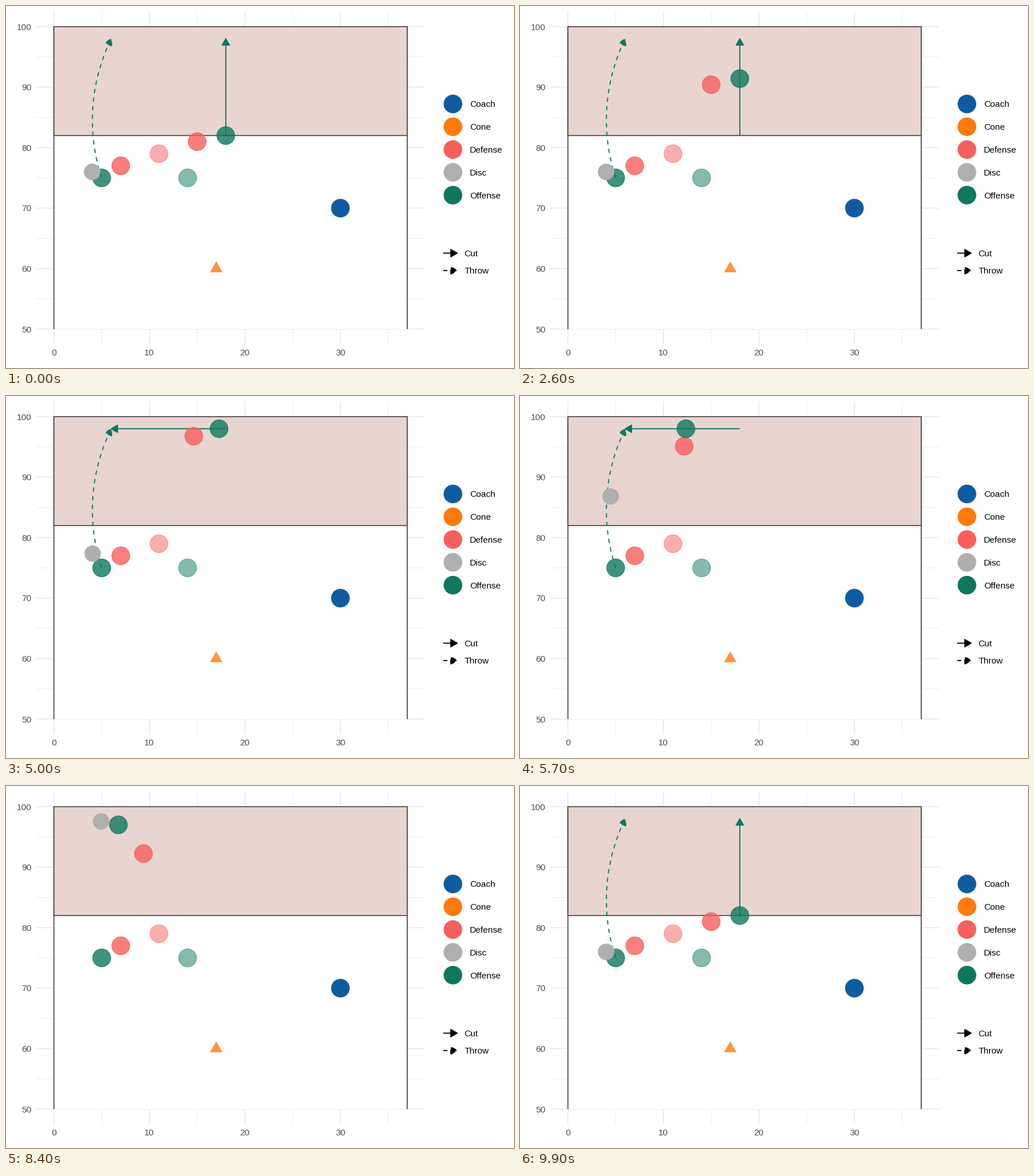
Animation of 885 by 632 pixels, one loop 10000 ms. Source, as a matplotlib script:

```python
import numpy as np
import matplotlib.pyplot as plt
from matplotlib.animation import FuncAnimation
from matplotlib.lines import Line2D
from matplotlib.patches import Circle, Polygon, Rectangle

W, H, DPI = 885, 632, 100
PT = 72 / DPI            # pixels to points
LINE = 1.87              # standard line width in pixels
RING = 1.24              # outline of the markers

BLUE, ORANGE, RED = "#0E5C9F", "#FF7A0A", "#F75F5B"
GRAY, GREEN = "#AFAFAF", "#0F775F"
GRID, BORDER, ZONE = "#EBEBEB", "#575053", "#E8D5D0"

plt.rcParams["font.family"] = "Liberation Sans"
plt.rcParams["path.snap"] = False

fig = plt.figure(figsize=(W / DPI, H / DPI), dpi=DPI, facecolor="white")
ax = fig.add_axes([0, 0, 1, 1])
ax.set_xlim(0, W)
ax.set_ylim(H, 0)
ax.axis("off")


def px(x, y):
    """Field coordinates to stage pixels."""
    return np.array([83.5 + 16.635 * x, 564.1 - 10.56 * (y - 50)])


def line(points, color, width=LINE, style="-", z=1):
    xs, ys = np.transpose(points)
    return ax.add_line(Line2D(xs, ys, color=color, lw=width * PT, ls=style, zorder=z,
                              solid_capstyle="butt", dash_capstyle="butt"))


def label(x, y, text, color="black", ha="left"):
    ax.text(x, y + 5.5, text, color=color, ha=ha, va="baseline", fontsize=15.45 * PT)


def dot(center, color, radius=15.6, alpha=1.0, z=6):
    return ax.add_patch(Circle(center, radius, facecolor=color, edgecolor=color,
                               lw=RING * PT, alpha=alpha, zorder=z))


def arrow(points, color, style="-"):
    """Line with a filled head whose outline shares the line style."""
    points = np.asarray(points, float)
    tip = points[-1]
    dx, dy = points[-2] - tip
    back = np.arctan2(dy, dx)
    wings = [tip + 12.64 * np.array([np.cos(a), np.sin(a)])
             for a in (back - np.pi / 6, back + np.pi / 6)]
    head = Polygon([wings[0], tip, wings[1]], closed=True, facecolor=color,
                   edgecolor=color, lw=LINE * PT, ls=style, joinstyle="round",
                   capstyle="butt", zorder=4)
    return [line(points, color, style=style, z=4), ax.add_patch(head)]


def arc(p, q, sag):
    """Circular arc from p to q that bulges left by sag."""
    half = np.hypot(*(q - p)) / 2
    u = (q - p) / (2 * half)
    n = np.array([u[1], -u[0]])
    r = (half ** 2 + sag ** 2) / (2 * sag)
    center = (p + q) / 2 - n * (r - sag)
    phi = np.arcsin(half / r)
    return [center + r * (n * np.cos(a) + u * np.sin(a))
            for a in np.linspace(-phi, phi, 81)]


DASH = (0, (4, 4))

# Grid and axis labels
LEFT, RIGHT, TOP, BOTTOM = 52.8, 729.8, 9.7, 590.5
for v in range(0, 40, 5):
    x = px(v, 50)[0]
    line([(x, TOP), (x, BOTTOM)], GRID, LINE if v % 10 == 0 else LINE / 2)
    if v % 10 == 0:
        label(x, 605, str(v), "#4D4D4D", "center")
for v in range(50, 101, 5):
    y = px(0, v)[1]
    line([(LEFT, y), (RIGHT, y)], GRID, LINE if v % 10 == 0 else LINE / 2)
    if v % 10 == 0:
        label(44.2, y, str(v), "#4D4D4D", "right")


def box(low, high, **kw):
    (x0, y0), (x1, y1) = px(*low), px(*high)
    ax.add_patch(Rectangle((x0, y1), x1 - x0, y0 - y1, **kw))


# Field
box((0, 50), (37, 100), facecolor="white", edgecolor="none", zorder=2)
for v in (0, 37):
    line([px(v, 50), px(v, 100)], BORDER, z=3)
box((0, 82), (37, 100), facecolor=ZONE, edgecolor=BORDER, lw=LINE * PT,
    joinstyle="miter", zorder=3)

# Markers that stay put
dot(px(5, 75), GREEN, alpha=0.8)
dot(px(7, 77), RED, alpha=0.8)
dot(px(14, 75), GREEN, alpha=0.5)
dot(px(11, 79), RED, alpha=0.5)
dot(px(30, 70), BLUE)
cone = px(17, 60) + np.array([(0, -12.62), (10.93, 6.31), (-10.93, 6.31)])
ax.add_patch(Polygon(cone, facecolor=ORANGE, edgecolor="none", alpha=0.8, zorder=6))

# Legends
names = ("Coach", "Cone", "Defense", "Disc", "Offense")
for i, (name, color) in enumerate(zip(names, (BLUE, ORANGE, RED, GRAY, GREEN))):
    y = 171 + 39.8 * i
    dot((778.6, y), color)
    label(808.2, y, name)
for y, name, style in ((431.5, "Cut", "-"), (461.8, "Throw", DASH)):
    arrow([(761.6, y), (785.9, y)], "black", style)
    label(798.5, y, name)

# Planned moves
throw = arrow(arc(px(5, 75), px(6, 98), 23.8), GREEN, DASH)
cut_up = arrow([px(18, 82), px(18, 98)], GREEN)
cut_left = arrow([px(18, 98), px(6, 98)], GREEN)

# Moving markers with their place in each of the three states
movers = [
    (dot(px(15, 81), RED, alpha=0.8, z=7), [(15, 81), (15, 97), (9, 93)]),
    (dot(px(18, 82), GREEN, alpha=0.8, z=8), [(18, 82), (18, 98), (6, 98)]),
    (dot(px(4, 76), GRAY, radius=13.74, z=9), [(4, 76), (4, 76), (5, 99)]),
]
MOVES = ((16, 33), (49, 66), (83, 99))   # first and last frame of each move


def show(parts, on):
    for part in parts:
        part.set_visible(on)


def update(i):
    t = [float(np.clip((i - a) / (b - a), 0, 1)) for a, b in MOVES]
    for mark, stops in movers:
        stops = np.array(stops + stops[:1], float)
        mark.center = tuple(px(*(stops[0] + np.dot(t, np.diff(stops, axis=0)))))
    show(throw, i < 67 or i == 99)
    show(cut_up, i < 33 or i == 99)
    show(cut_left, 33 <= i < 67)
    return []


anim = FuncAnimation(fig, update, frames=100, interval=100, repeat=True,
                     repeat_delay=0, init_func=lambda: update(0))
plt.show()
```
